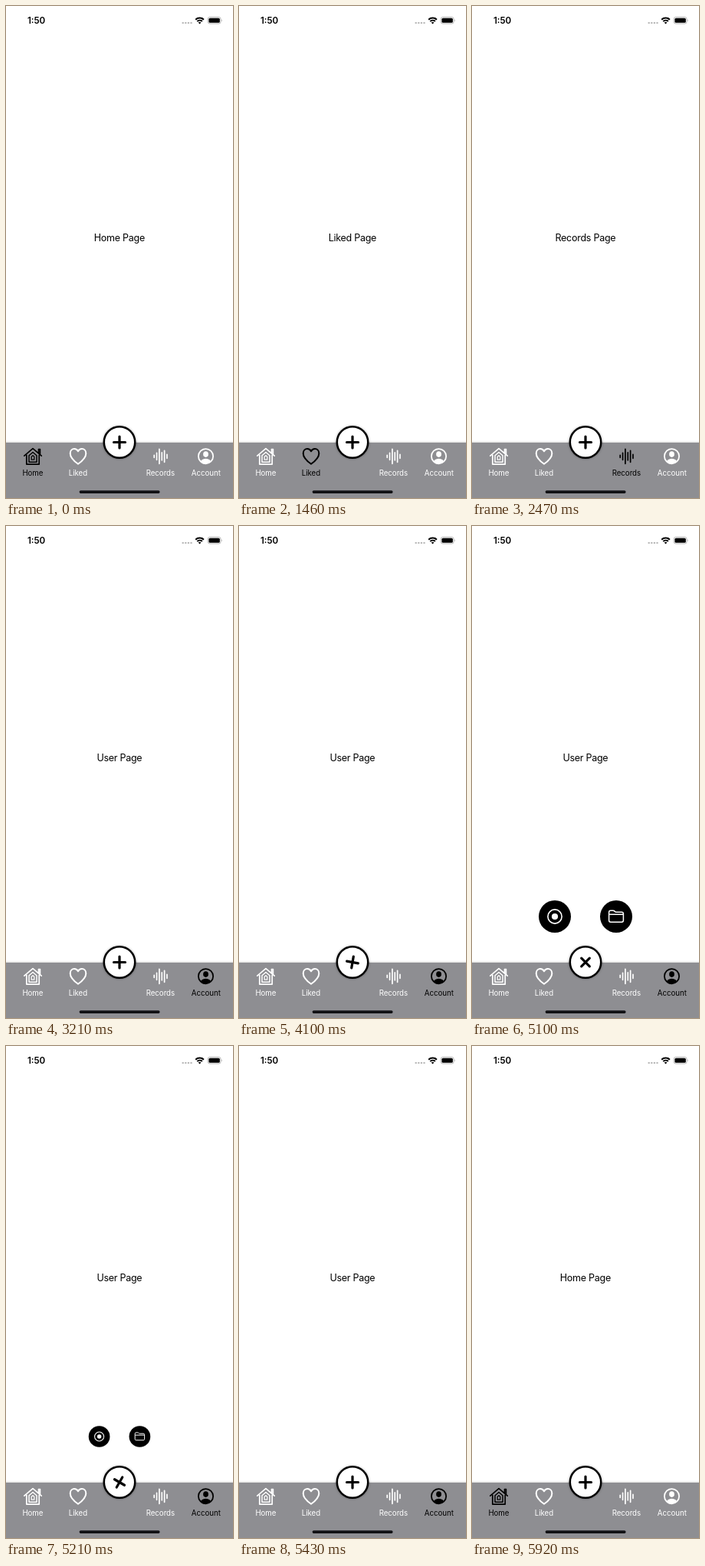
Animation of 296x640 px, one loop 6390 ms. Source, as an HTML page:

```html
<!DOCTYPE html>
<html lang="en">
<head>
<meta charset="utf-8">
<title>Tab bar</title>
<style>
  html, body { margin: 0; width: 100%; height: 100%; overflow: hidden; background: #fff; }
  svg { display: block; width: 100vw; height: 100vh; }
  text { font-family: Inter, Roboto, sans-serif; text-anchor: middle; }
  .page { font-size: 12.5px; letter-spacing: -.26px; }
  .clock { font-size: 11.6px; font-weight: 600; }
  .tab { color: #fff; fill: currentColor; }
  .tab.on { color: #000; }
  .tab text { font-size: 9.7px; letter-spacing: -.03px; }
  .line { fill: none; stroke: currentColor; stroke-linecap: round; stroke-linejoin: round; }
</style>
</head>
<body>
<svg viewBox="0 0 296 640">
  <defs>
    <filter id="soft" x="-30%" y="-30%" width="160%" height="160%">
      <feGaussianBlur stdDeviation="1.7"/>
    </filter>
    <clipPath id="face"><circle cx="260.5" cy="585.7" r="9.6"/></clipPath>
  </defs>
  <rect width="296" height="640" fill="#fff"/>

  <text class="clock" x="39.6" y="23">1:50</text>
  <path d="M229.6 21.9h2.2m1.4 0h2.2m1.4 0h2.2m1.4 0h2.2" stroke="#b8b8b8" stroke-width="2"/>
  <g fill="none" stroke="#000" stroke-width="2">
    <path d="M247.2 17.7a7.6 7.6 0 0 1 10.7 0"/>
    <path d="M249.3 20a4.6 4.6 0 0 1 6.5 0"/>
  </g>
  <path d="M252.55 23.5l-1.8-1.9a2.6 2.6 0 0 1 3.6 0z"/>
  <rect x="263.1" y="14.4" width="17" height="8.6" rx="2.6" fill="none" stroke="#a6a6a6" stroke-width=".8"/>
  <rect x="264.4" y="15.7" width="14.4" height="6" rx="1.5"/>
  <path d="M281.2 17.2q1.5 1.5 0 3z" fill="#a6a6a6"/>

  <text id="page" class="page" x="147.9" y="306.3"></text>

  <rect x="-8" y="568" width="312" height="80" fill="#000" opacity=".33" filter="url(#soft)"/>
  <rect y="568" width="296" height="72" fill="#8e8e92"/>

  <g class="tab">
    <g class="line" stroke-width="1.7">
      <path d="M23.8 585.1L35 575.7l11.2 9.4M42.5 581.5v-5h1.9v6.6"/>
      <path d="M26.8 584.4v11.7h16.4v-11.7"/>
      <path d="M30 593.2v-8.4l5-4.3 5 4.3v8.4z" stroke-width="1.5"/>
      <path d="M33.2 590.2v-3.9l1.8-1.6 1.8 1.6v3.9z" stroke-width="1.3"/>
    </g>
    <text x="34.9" y="611">Home</text>
  </g>
  <g class="tab">
    <path class="line" stroke-width="2" d="M94 595.8C88.7 592 83.7 587.4 83.7 582C83.7 578.5 86.1 576.1 89.1 576.1C91.3 576.1 93 577.3 94 579.3C95 577.3 96.7 576.1 98.9 576.1C101.9 576.1 104.3 578.5 104.3 582C104.3 587.4 99.3 592 94 595.8Z"/>
    <text x="93.9" y="611">Liked</text>
  </g>
  <g class="tab">
    <path id="wave" class="line" stroke-width="1.7"/>
    <text x="201.4" y="611">Records</text>
  </g>
  <g class="tab">
    <circle class="line" stroke-width="1.8" cx="260.5" cy="585.7" r="9.6"/>
    <ellipse cx="260.5" cy="583.1" rx="3.4" ry="3.8"/>
    <ellipse cx="260.5" cy="594" rx="7" ry="5.3" clip-path="url(#face)"/>
    <text x="260.8" y="611">Account</text>
  </g>

  <rect x="95.6" y="630.2" width="105" height="3.7" rx="1.85" fill="#111114"/>

  <g id="menu">
    <circle cx="108" cy="508" r="21"/>
    <circle cx="188" cy="508" r="21"/>
    <g fill="none" stroke="#fff" stroke-width="1.6" stroke-linejoin="round">
      <circle cx="108" cy="508" r="9.1"/>
      <path d="M178.6 513V502.400q0-2.200 2.200-2.200h3.200q1 0 1.700.7l.7.7q.6.600 1.500.600h7.300q2.200 0 2.200 2.200V513q0 2.200-2.200 2.200H180.800q-2.200 0-2.200-2.200zM178.600 505.200h18.800" stroke-width="1.5"/>
    </g>
    <circle cx="108" cy="508" r="4.1" fill="#fff"/>
  </g>

  <circle cx="148" cy="567.500" r="21.500" opacity=".36" filter="url(#soft)"/>
  <circle cx="148" cy="567.500" r="20.200" fill="#fff" stroke="#000" stroke-width="2.500"/>
  <path id="plus" d="M140.500 567.500h15M148 560v15" stroke="#000" stroke-width="3.200" stroke-linecap="round"/>
</svg>
<script>
  const LOOP = 6390;
  const $ = id => document.getElementById(id);
  const page = $("page"), menu = $("menu"), plus = $("plus");
  const tabs = [...document.querySelectorAll(".tab")];
  const names = ["Home Page", "Liked Page", "Records Page", "User Page"];

  // [start ms, selected tab]
  const visits = [[0, 0], [1460, 1], [2470, 2], [3210, 3], [5920, 0]];
  // [start ms, plus angle, menu scale]
  const poses = [
    [0, 0, 0],
    [4100, 10, 0], [4210, 33, .73], [4310, 44.5, .985],
    [5100, 45, 1], [5210, 30, .66], [5320, 7, .16], [5430, 0, 0]
  ];

  $("wave").setAttribute("d", [3, 9, 19, 10, 15, 5]
    .map((h, i) => `M${193.2 + i * 3.35} ${585.8 - h / 2}v${h}`).join(""));

  const current = (list, t) => list.findLast(step => step[0] <= t);

  function draw(t) {
    const [, tab] = current(visits, t);
    const [, angle, scale] = current(poses, t);
    page.textContent = names[tab];
    tabs.forEach((el, i) => el.classList.toggle("on", i === tab));
    plus.setAttribute("transform", `rotate(${angle} 148 567.5)`);
    menu.setAttribute("visibility", scale ? "visible" : "hidden");
    menu.setAttribute("transform", `translate(148 508) scale(${scale}) translate(-148 -508)`);
  }

  const start = performance.now();
  function tick() {
    draw((performance.now() - start) % LOOP);
    requestAnimationFrame(tick);
  }
  tick();
</script>
</body>
</html>
```
